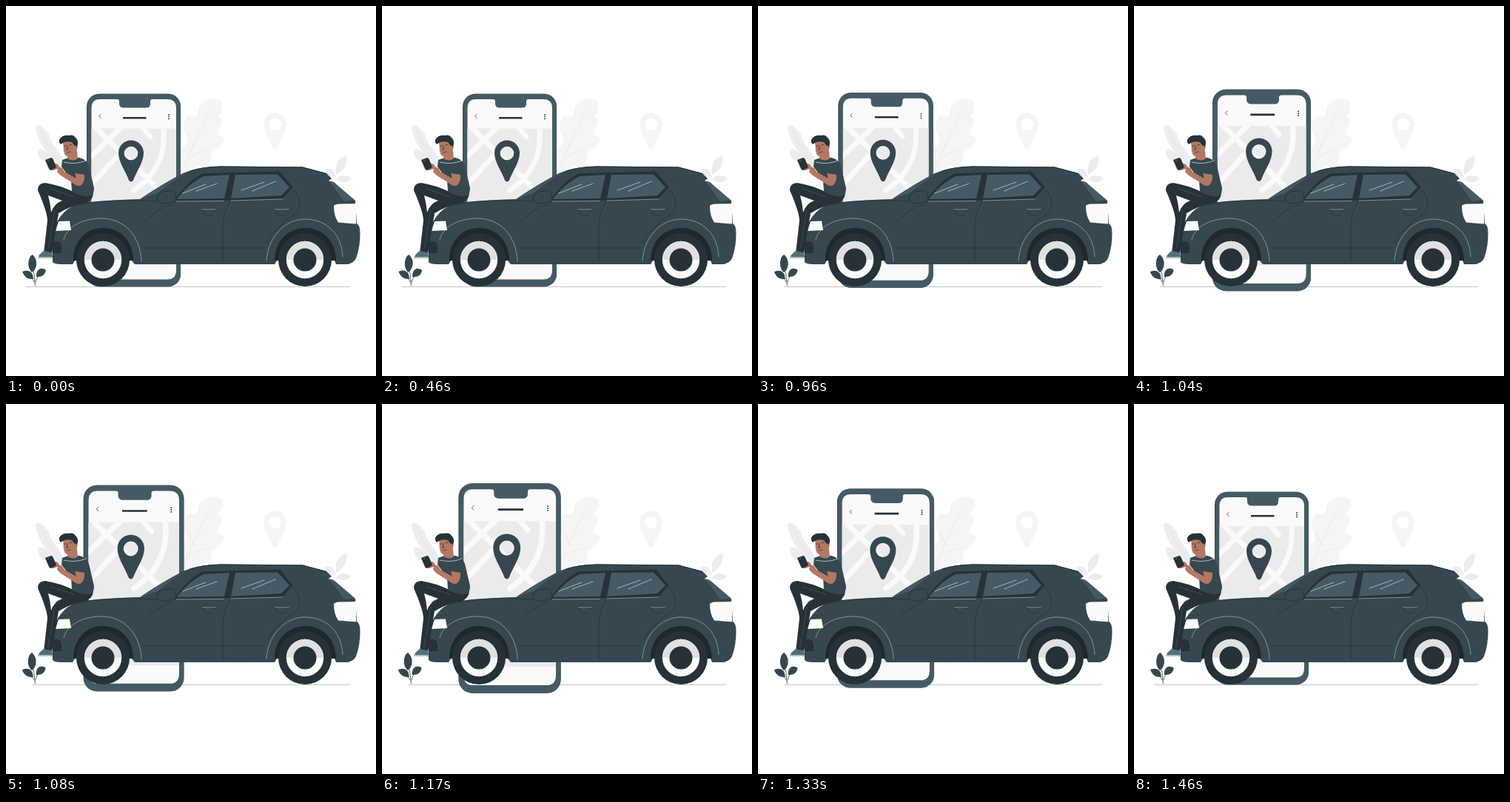
Animation, 500 px wide and 500 px high, one loop 1540 ms. Source, as an HTML page:

```html
<!DOCTYPE html>
<html lang="en">
<head>
<meta charset="utf-8">
<title>Car sharing</title>
<style>
html, body { margin: 0; width: 100%; height: 100%; overflow: hidden; background: #fff; }
svg { display: block; width: 100%; height: 100%; }
.line { fill: none; stroke-linecap: round; stroke-linejoin: round; }
</style>
</head>
<body>
<svg viewBox="0 0 500 500">
  <defs>
    <clipPath id="map"><path d="M115.500 165.500H230V346.500H115.500Z"/></clipPath>
    <g id="wheel">
      <circle r="36" fill="#263238"/>
      <circle r="25.200" fill="#fafafa"/>
      <path d="M-25.200 0A25.200 25.200 0 0 1 25.200 0Z" fill="#e0e0e0"/>
      <circle r="15.500" fill="#263238"/>
    </g>
    <path id="pin" fill-rule="evenodd" d="M0-17C-10-17-17-9-17 0C-17 13-7 25-3 37Q0 41 3 37C7 25 17 13 17 0C17-9 10-17 0-17ZM0-8.800A9.300 9.300 0 1 1 0 9.800A9.300 9.300 0 1 1 0-8.800Z"/>
  </defs>

  <!-- Background foliage -->
  <g fill="#f5f5f5">
    <path d="M234 222C229 207 230 193 239 190C244 187 246 181 243 175C236 160 245 143 253 149C259 152 259 143 261 136C267 124 283 123 291 128C296 136 290 146 284 150C291 150 295 156 290 163C287 168 284 172 286 175C295 174 297 181 291 188C283 196 276 198 276 202C282 204 277 214 266 216C254 218 248 221 244 228Z"/>
    <use href="#pin" transform="translate(363.500 159.500) scale(.9)"/>
  </g>
  <g fill="#ededed">
    <path d="M40 164Q42 159 47 162Q58 169 62 184L76 204L78 220L66 217Q54 214 45 205Q41 197 44 193Q50 193 55 198Q42 180 40 164Z"/>
    <path d="M446 224C444 212 452 203 460 202C463 212 457 222 446 228ZM445 231C439 231 432 228 431 221C438 217 445 222 445 231ZM446 235C449 228 458 227 466 232C463 239 453 240 446 235Z"/>
  </g>
  <path class="line" stroke="#e4e4e4" stroke-width=".7" d="M239 222Q254 185 275 143M253 189L246 172M247 203L270 195M75 217Q61 195 46 168"/>
  <path id="ground" stroke="#b5b5b5" stroke-width=".8" d="M27 379.500H465"/>

  <!-- Large phone -->
  <g id="phone">
    <rect x="109" y="118.700" width="127" height="260.600" rx="17" fill="#37474f"/>
    <rect x="110" y="118.700" width="126" height="260.600" rx="17" fill="#455a64"/>
    <path fill="#fafafa" d="M127 126H150Q153 126 153 129V133Q154 137.500 159 137.500H190Q194 137.500 195 133V129Q195 126 198 126H218Q230 126 230 138V357Q230 369.500 218 369.500H127Q115.500 369.500 115.500 357V138Q115.500 126 127 126Z"/>
    <g clip-path="url(#map)">
      <path fill="#ebebeb" d="M115 165H230V349H115Z"/>
      <path class="line" stroke="#fafafa" stroke-width="7" d="M117 160L204 246M111 207L158 162M111 246L151 202M181 160L195 177M212 160Q220 217 173 249"/>
    </g>
    <path class="line" stroke="#37474f" stroke-width=".8" d="M128 146.500L125.500 149L128 151.500"/>
    <g fill="#263238">
      <path d="M158 150H189.500V152.500H158Z"/>
      <circle cx="220" cy="147" r=".9"/><circle cx="220" cy="149.700" r=".9"/><circle cx="220" cy="152.400" r=".9"/>
    </g>
    <use href="#pin" x="169" y="198.500" fill="#37474f"/>
  </g>

  <!-- Car -->
  <path fill="#37474f" d="M63 346L62 307Q66 294 74 284Q82 273 96 268Q115 263 181 261Q207 243 239 226Q260 217 290 216.500L401 217.500L433 226L440 233L436 236L472 263L474 294Q478 296 478.500 305Q479 325 473 341Q470 347 462 349H446L444 344H366L363 349H174L170 344H93L90 349H75Q65 349 63 346Z"/>
  <path fill="#455a64" d="M183 261Q209 242 245 225Q222 238 206 252ZM437 236L443 238L471 262L457 264Z"/>
  <path class="line" stroke="#263238" d="M249 223Q264 217.500 291 217L401 218L433 226.500"/>
  <path fill="#263238" stroke="#263238" stroke-linejoin="round" d="M228 263Q243 239 265 227L370 224L387 245L374 260L303 262Z"/>
  <path fill="#455a64" d="M231 261Q245 241 267 230L302 228L295 260ZM310 228L367 227.500L383 245L372 256L304 260Z"/>
  <path class="line" stroke="#cfd8dc" stroke-width=".7" d="M239 253L270 241M257 250L285 240M318 249L349 238M333 250L364 237"/>
  <path fill="#37474f" stroke="#263238" d="M204 264Q203 254 211 251L224 249Q231 253 229 264L213 267Z"/>
  <path class="line" stroke="#263238" stroke-width=".8" d="M99 268Q143 260 204 264M304 262Q293 278 293 299V345M225 267Q203 275 187 292M185 327H350M385 246Q404 262 393 279Q366 297 352 319M265 277Q275 274 284 277M266 278Q269 286 280 282M363 277Q373 274 382 277M364 278Q367 286 378 282"/>
  <path class="line" stroke="#cfd8dc" stroke-width=".5" d="M78 316C83 297 104 287 131 287C161 288 182 312 183 345M352 344C354 312 377 288 404 288C433 288 454 308 455 339M266 275H283M364 275H382M230 264L294 263.500M304 263L374 261"/>
  <path fill="#fafafa" d="M71 291L86 290.500L88 303L67 304ZM443 270Q445 267.500 450 267.500L473 267V294.500L449 292.500Q443 284 443 270Z"/>
  <path fill="#263238" d="M62 318H72Q77 324 74 334H63Z"/>
  <path fill="#1f282c" d="M91 344C91 319 107 300 131 300C156 300 172 319 172 344ZM363 344C363 319 380 300 405 300C429 300 446 319 446 344Z"/>
  <use href="#wheel" x="131" y="343"/>
  <use href="#wheel" x="404" y="343"/>

  <!-- Sitting man -->
  <path fill="#263238" d="M91 251L118 252Q118 263 106 267Q87 270 71 280L62 334H51L56 290Q56 279 43 249Q43 239 53 239Q72 242 91 251Z"/>
  <path fill="#fff" d="M57 256L76 263Q65 267 61 279Q60 267 57 256Z"/>
  <path class="line" stroke="#455a64" stroke-width=".7" d="M60 247L91 257M66 275L57 328"/>
  <path fill="#546e7a" d="M51 331L62 333L63 339H44Q44 336 51 331Z"/>
  <path fill="#b0bec5" d="M43 339H63V341H43Z"/>
  <path fill="#37474f" d="M76 208Q87 203 99 205Q109 207 112 216L119 246Q119 255 114 257Q98 257 89 251L88 235L75 217Z"/>
  <path class="line" stroke="#cfd8dc" stroke-width=".8" d="M78 211Q94 215 108 209"/>
  <path fill="#b27863" d="M83 199L96 196L97 206Q91 211 83 206Z"/>
  <path fill="#b27863" d="M77 184Q86 179 94 184Q98 188 96 194Q95 203 87 204Q79 204 78 196Z"/>
  <path fill="#263238" d="M74 187Q70 183 73 179Q78 174 84 175Q91 173 94 178Q99 182 96 190L92 188L89 184Q81 182 77 185Z"/>
  <path class="line" stroke="#263238" stroke-width=".8" d="M79 189H82M86 188L89 187M83 198L87 197M83 190L82 194L84 194"/>
  <path fill="#b27863" d="M93 226L106 228Q107 236 102 242Q97 245 90 239L74 229L69 224L71 217L76 219L79 224L95 233ZM56 215Q57 208 63 211L70 214L73 219L64 222Q58 221 56 215Z"/>
  <path fill="#263238" d="M53 208L61 205Q63 205 64 208L68 218L61 222Q59 222 58 220Z"/>
  <circle cx="57" cy="209" r=".8" fill="#90a4ae"/>

  <!-- Small plant -->
  <g id="plant">
    <path class="line" stroke="#37474f" stroke-width=".8" d="M39.500 378Q39 363 35 350M39 374Q35 366 28 362M40 373Q42 365 49 359"/>
    <path fill="#37474f" d="M35 360Q29 354 30.500 345Q32 337 36 336Q42 342 41 350Q40 357 35 360ZM37 369Q26 370 22 359Q32 355 36 363ZM41 366Q40 358 46 355Q51 354 54 357Q52 367 41 366Z"/>
  </g>
</svg>
<script>
const LOOP = 1540, PEAK = 1130;
const [phone, plant, ground] = ["phone", "plant", "ground"].map(id => document.getElementById(id));
const clamp = x => Math.max(0, Math.min(1, x));

// Quick swell to the peak, then a softer return.
const pulse = t => t < PEAK
  ? clamp((t - 900) / 230) ** 1.7
  : clamp((1460 - t) / 330) ** 1.25;

function draw(now) {
  const t = now % LOOP;
  const swell = pulse(t);
  const scale = 1 + 0.104 * swell;
  phone.setAttribute("transform", `translate(172.7 249) scale(${scale}) translate(-172.7 -249)`);
  plant.setAttribute("transform", `rotate(${Math.sin(t / LOOP * 2 * Math.PI)} 39.5 378)`);
  ground.setAttribute("d", `M${swell > 0 ? 35 : 27} 379.500H465`);
}

const start = performance.now();
(function tick() {
  draw(performance.now() - start);
  requestAnimationFrame(tick);
})();
</script>
</body>
</html>
```
